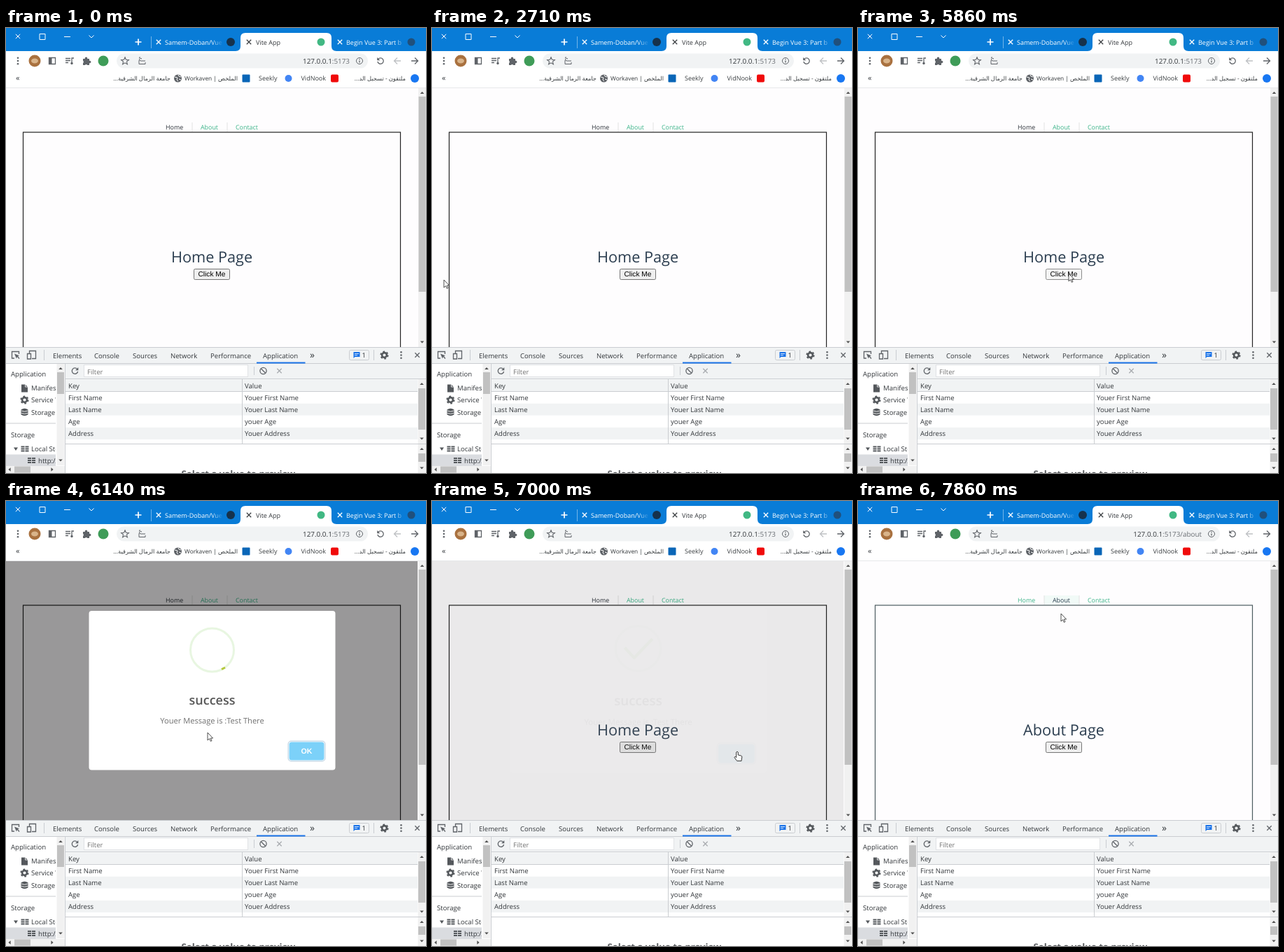
Write an HTML page that moves like this. It is 600 px wide and 636 px high and loops after 8000 ms.

```html
<!DOCTYPE html>
<html lang="en">
<head>
<meta charset="utf-8">
<title>Vite App</title>
<style>
  html, body { margin: 0; width: 100%; height: 100%; overflow: hidden; background: #fff; }
  svg { display: block; width: 600px; height: 636px; }
  text { font-family: "Open Sans", "Noto Sans", sans-serif; font-size: 9.6px; fill: #33373b; text-rendering: geometricPrecision; }
  .tab { font-size: 9px; }
  .tab.inactive { fill: #fff; }
  .mark { font-size: 9px; fill: #3c4043; }
  .rtl { direction: rtl; font-family: "Noto Sans", "DejaVu Sans", sans-serif; font-size: 8.3px; }
  .nav { font-size: 8.9px; }
  .mid { text-anchor: middle; }
  .button { font: 10.2px "Liberation Sans", Arial, sans-serif; fill: #000; }
  .ok { font: bold 10.6px "Liberation Sans", Arial, sans-serif; fill: #fff; }
  .line { fill: none; stroke: #5f6368; stroke-width: 1.3; }
  .white { fill: none; stroke: #fff; stroke-width: 1; }
  .rule { fill: none; stroke: #cacdd1; }
  #modal { transform-origin: 294px 271px; }
</style>
</head>
<body>
<svg viewBox="0 0 600 636">
  <defs>
    <path id="cross" d="M-3.2-3.2 3.2 3.2M3.2-3.2-3.2 3.2"/>
    <path id="tri" d="M-2.8 1.6H2.8L0-1.6Z" fill="#505050"/>
    <g id="dots" fill="#5f6368"><circle cy="-4.2" r="1.3"/><circle r="1.3"/><circle cy="4.2" r="1.3"/></g>
    <g id="gear" fill="none" stroke="#54585c">
      <circle r="3.4" stroke-width="2.6"/><circle r="5.2" stroke-width="1.8" stroke-dasharray="2.7 2.745"/>
    </g>
    <g id="reload"><path class="line" d="M3.2-2.6A4.2 4.2 0 1 0 4.1 1"/><path d="M4.8-5V-.8H.6Z" fill="#5f6368"/></g>
    <path id="grid" d="M-5.5-4h5v2h-5zM.5-4h5v2h-5zM-5.5-1h5v2h-5zM.5-1h5v2h-5zM-5.5 2h5v2h-5zM.5 2h5v2h-5z" fill="#54585c"/>
    <linearGradient id="fade"><stop stop-color="#097cd7" stop-opacity="0"/><stop offset="1" stop-color="#097cd7"/></linearGradient>
    <clipPath id="pageClip"><path d="M0 86H588V456H0Z"/></clipPath>
    <clipPath id="sideClip"><path d="M0 480H71V626H0Z"/></clipPath>
  </defs>

  <!-- title bar -->
  <rect width="600" height="33" fill="#097cd7"/>
  <g class="white">
    <use href="#cross" x="17" y="12"/>
    <path d="M48 8.5h8v8h-8zM83 12.5h9M118.500 10.500l3.500 3.500 3.500-3.500"/>
    <path d="M184.500 20h9M189 15.500v9" stroke-width="1.7"/>
    <path d="M207.500 12v17" stroke="#73b4e8"/>
    <use href="#cross" x="218" y="20" stroke-width="1.3"/>
    <use href="#cross" x="477" y="20" stroke-width="1.3"/>
  </g>
  <text class="tab inactive" x="227" y="23.500">Samem-Doban/Vue</text>
  <text class="tab inactive" x="486" y="23.500">Begin Vue 3: Part b</text>
  <path d="M293 12h16v16h-16zM554 12h16v16h-16z" fill="none"/>
  <rect x="293" y="12" width="17" height="16" fill="url(#fade)"/>
  <rect x="554" y="12" width="17" height="16" fill="url(#fade)"/>
  <circle cx="321" cy="20" r="6" fill="#16324c"/>
  <circle cx="579" cy="20" r="5.500" fill="#20507c"/>
  <path d="M328 33q7 0 7-7V14q0-7 7-7H458q7 0 7 7V26q0 7 7 7Z" fill="#fff"/>
  <use href="#cross" x="347" y="20" stroke="#3c4043" stroke-width="1.300"/>
  <text class="tab" x="357" y="23.500">Vite App</text>
  <circle cx="450" cy="20" r="5.500" fill="#41b883"/>

  <!-- toolbar -->
  <rect y="33" width="600" height="53" fill="#fff"/>
  <rect x="158" y="36.500" width="359" height="21" rx="10.500" fill="#f1f3f4"/>
  <use href="#dots" x="17" y="47"/>
  <circle cx="41" cy="47" r="8.500" fill="#a9713f"/><ellipse cx="41" cy="47" rx="5" ry="3.500" fill="#d9b48a"/>
  <g class="line">
    <path d="M61.500 42.500h9v9h-9z"/><path d="M63.500 43v8" stroke-width="4"/>
    <path d="M85 43.500h7M85 46.500h7M85 49.500h4M94 51v-8h3"/>
    <path d="M170 41.800l1.500 3.500 3.900.3-3 2.500 1 3.800-3.400-2.100-3.400 2.100 1-3.800-3-2.500 3.900-.3Z" stroke-width="1.100"/>
    <path d="M190 46v5.500h9V49M199 47h-6.500q-2 0-2-3M194 44l-4-1.500 1.500-1" stroke-width="1"/>
    <circle cx="505" cy="47" r="4.500" stroke-width="1"/><path d="M505 46.500v3M505 44v1.300"/>
    <path d="M564 47h-9M559 42.500L554.500 47l4.500 4.500" stroke="#bfc1c4"/>
    <path d="M579 47h9M584 42.500l4.500 4.500-4.500 4.500"/>
  </g>
  <path d="M110 44h2.800a1.800 1.800 0 1 1 3.400 0h2.800v2.800a1.800 1.800 0 1 1 0 3.400V53h-3a1.700 1.700 0 0 0-3 0h-3v-3a1.700 1.700 0 0 0 0-3Z" fill="#5f6368"/>
  <circle cx="94" cy="50.500" r="1.700" fill="#5f6368"/>
  <circle cx="139" cy="47" r="7.500" fill="#3f9c58"/>
  <use href="#reload" transform="translate(535 47) scale(-1 1)"/>
  <text x="491" y="50.700" text-anchor="end" style="font-size:9.900px">127.0.0.1<tspan fill="#6b6f74">:5173<tspan id="route"></tspan></tspan></text>

  <!-- bookmarks -->
  <text x="14" y="75" style="font-size:11px">«</text>
  <text class="mark rtl" x="235" y="75">جامعة الرمال الشرقية...</text>
  <circle cx="245.500" cy="72" r="5.500" fill="#5f6368"/>
  <path d="M241 70l4 1-1 3 2 2M246 67l1 2 3 1M247 73l3 1" stroke="#fff" fill="none"/>
  <text class="mark rtl" x="331" y="75">الملخص | Workaven</text>
  <rect x="337.500" y="66.500" width="11" height="11" rx="1" fill="#0a66b7"/>
  <text class="mark" x="361" y="75">Seekly</text>
  <circle cx="403.500" cy="72" r="5" fill="#4285f4"/>
  <text class="mark" x="421.500" y="75">VidNook</text>
  <rect x="464" y="66.500" width="11" height="11" rx="2" fill="#f00a0a"/>
  <text class="mark rtl" x="571" y="75">ملتقون - تسجيل الد...</text>
  <circle cx="584" cy="72" r="6" fill="#1877f2"/>
  <path class="rule" d="M0 85.500H600" stroke-opacity=".45"/>

  <!-- page -->
  <rect y="86" width="589" height="370" fill="#fefdfe"/>
  <g clip-path="url(#pageClip)">
    <rect id="hover" x="266" y="135" width="50" height="13" fill="#00bd7e"/>
    <path d="M266 135v13M316 135v13" stroke="#e2e2e2"/>
    <text class="nav" id="home" x="228" y="145">Home</text>
    <text class="nav" id="about" x="278" y="145">About</text>
    <text class="nav" x="328" y="145" style="fill:#3cb489">Contact</text>
    <rect id="frame" x="24.500" y="149" width="539" height="330" fill="none" stroke-width="1.200"/>
    <text class="mid" id="heading" x="294" y="335" style="font-size:21.700px;fill:#2c3e50"></text>
    <rect id="button" x="268.500" y="344.500" width="51" height="15" rx="1.800"/>
    <text class="button mid" x="294" y="355.300">Click Me</text>
    <rect id="shade" y="86" width="588" height="370"/>
    <g id="modal">
      <rect x="118.500" y="157" width="352" height="227.500" rx="4" fill="#fff"/>
      <circle cx="294.500" cy="213" r="31" fill="none" stroke="#a5dc86" stroke-opacity=".25" stroke-width="3"/>
      <path id="spark" d="M308 240.500l5-2.500" stroke="#b5c83c" stroke-width="3"/>
      <path id="check" d="M276 212l13 14 25-26" pathLength="1" stroke-dasharray="1 1" fill="none" stroke="#a5dc86" stroke-width="4" stroke-linejoin="round"/>
      <text class="mid" x="294.500" y="291" style="font-size:18px;font-weight:600;fill:#595959">success</text>
      <text class="mid" x="294.500" y="318.300" style="font-size:11.100px;fill:#6f6f6f">Youer Message is :Test There</text>
      <rect x="402.500" y="342.500" width="54" height="30" rx="5" fill="#c2d5e4"/>
      <rect x="403.700" y="343.700" width="51.600" height="27.600" rx="4" fill="#fff"/>
      <rect x="404.500" y="344.500" width="50" height="26" rx="3.500" fill="#7cd1f9"/>
      <text class="ok mid" x="429.500" y="361.300">OK</text>
    </g>
  </g>
  <g id="bars"></g>

  <!-- developer tools -->
  <rect y="456" width="600" height="23" fill="#f1f3f4"/>
  <path class="rule" d="M0 456.500H600M0 479.500H600M54.500 460v15M525.500 460v15"/>
  <g class="line" stroke-width="1.200">
    <path d="M12 472H8.500V462.500H18.500V466"/><path d="M12 465.500l7 2.800-2.900 1.200-1.200 2.900Z" fill="#5f6368" stroke="none"/><path d="M16 469l3 3.500"/>
    <path d="M33.500 465V461.500H42.500V472.500H37M30.500 465.500h5v7.500h-5z"/>
    <use href="#cross" x="587.500" y="467.500"/>
  </g>
  <g id="tabs"></g>
  <rect x="358" y="477.500" width="69.500" height="2" fill="#1a73e8"/>
  <text x="434" y="472" style="font-size:14px">»</text>
  <rect x="490.500" y="460.500" width="28" height="14" rx="2" fill="#f1f3f4" stroke="#cacdd1"/>
  <path d="M496.500 463h9v7h-7l-2 2Z" fill="#1a73e8"/><path d="M498 465.500h6M498 467.700h4" stroke="#fff" stroke-width=".8"/>
  <text x="508.500" y="471.300">1</text>
  <use href="#gear" x="540.500" y="467.500"/>
  <use href="#dots" x="564.500" y="467.500"/>

  <!-- sidebar -->
  <g clip-path="url(#sideClip)">
    <rect y="480" width="72" height="146" fill="#fff"/>
    <rect y="609.500" width="72" height="16.500" fill="#dadce0"/>
    <path class="rule" d="M0 565H72"/>
    <path d="M22 509.500h5.500l3.500 3.500v7.500h-9z" fill="#54585c"/><path d="M27.500 509.500V513H31" stroke="#fff" fill="none" stroke-width=".8"/>
    <use href="#gear" x="26.500" y="531.500"/>
    <path d="M21.500 545.500q5-3.500 10 0v7q-5 3.500-10 0Z" fill="#54585c"/><path d="M21.500 547q5 2.500 10 0M21.500 550.300q5 2.500 10 0" stroke="#fff" fill="none" stroke-width=".9"/>
    <path d="M11 599.500h6l-3 4.500Z" fill="#54585c"/>
    <use href="#grid" x="27" y="601.500"/><use href="#grid" x="36.500" y="618"/>
    <g id="tree"></g>
  </g>

  <!-- storage table -->
  <rect x="85" y="480" width="515" height="21.500" fill="#f1f3f4"/>
  <use href="#reload" x="98.500" y="490"/>
  <rect x="111.500" y="481.500" width="234" height="17" fill="#fff" stroke="#e0e2e5"/>
  <text x="116" y="494.500" style="fill:#757575">Filter</text>
  <path class="rule" d="M354.500 484v12"/>
  <g class="line"><circle cx="367.500" cy="490" r="4.600"/><path d="M364.300 486.800l6.400 6.400"/>
    <use href="#cross" x="390.500" y="490" stroke="#a9acb0"/></g>
  <g id="rows"></g>
  <path class="rule" d="M85 501.500H600M85 519.500H588M337.500 502V594M85 594.500H600M84.500 480V636"/>
  <text class="mid" x="332" y="642" style="font-size:13.200px;font-weight:700;fill:#5c5f62">Select a value to preview</text>
  <g id="bars2"></g>

  <path id="arrow" d="M0 0V11L2.600 8.600 4.300 12.400 6 11.600 4.300 8H7.600Z" fill="#fff" stroke="#222" stroke-width=".8"/>
  <path id="hand" d="M-1.300 1Q0-1 1.300 1V5L5.500 6Q7 6.400 6.800 8L6 13.500H-.3L-4 8.600Q-3.700 7-2.400 7.600L-1.300 8.600Z" fill="#fff" stroke="#222" stroke-width=".9"/>
</svg>
<script>
const $ = id => document.getElementById(id);
const label = (x, y, words) => `<text x="${x}" y="${y}">${words}</text>`;

function scrollbar(x, top, bottom, thumbTop, thumbBottom, width = 11) {
  const mid = x + width / 2;
  return `<rect x="${x}" y="${top}" width="${width}" height="${bottom - top}" fill="#f1f1f1"/>
    <rect x="${x + .5}" y="${thumbTop}" width="${width - 1}" height="${thumbBottom - thumbTop}" fill="#c1c1c1"/>
    <use href="#tri" x="${mid}" y="${top + 6.5}"/>
    <use href="#tri" transform="translate(${mid} ${bottom - 7}) scale(1 -1)"/>`;
}

$('bars').innerHTML = scrollbar(589, 86, 456, 98, 377);
$('bars2').innerHTML = scrollbar(588.5, 502, 594, 515, 574) + scrollbar(588.5, 595, 636, 608, 620) +
  scrollbar(72.5, 480, 625, 492, 523) +
  `<rect y="626" width="84" height="10" fill="#f1f1f1"/><rect x="12" y="626.5" width="23" height="9" fill="#c1c1c1"/>
   <use href="#tri" transform="translate(5 631) rotate(-90)"/><use href="#tri" transform="translate(66 631) rotate(90)"/>`;

$('tabs').innerHTML = [['Elements', 67], ['Console', 126], ['Sources', 181], ['Network', 235],
  ['Performance', 292], ['Application', 367]].map(([name, x]) => label(x, 471.5, name)).join('');

$('tree').innerHTML = [[7, 498, 'Application'], [36, 518, 'Manifest'], [36, 535, 'Service Workers'],
  [36, 552.5, 'Storage'], [7, 585, 'Storage'], [36, 605, 'Local Storage'], [46, 622, 'http://127']]
  .map(item => label(...item)).join('');

$('rows').innerHTML = [['Key', 'Value'], ['First Name', 'Youer First Name'], ['Last Name', 'Youer Last Name'],
  ['Age', 'youer Age'], ['Address', 'Youer Address']].map(([key, value], i) =>
    `<rect x="85" y="${502.5 + 17.1 * i}" width="503" height="17.1" fill="${i % 2 ? '#fff' : '#f1f3f4'}"/>` +
    label(89, 515 + 17.1 * i, key) + label(341, 515 + 17.1 * i, value)).join('');

const LOOP = 8000, RATE = 7;
const pointer = [[12, 17, 600], [19, 17, 360], [24, 150, 275], [31, 298, 194], [36, 301, 262], [40, 302, 352],
  [42, 300, 350], [43, 288, 331], [45, 380, 348], [47, 436, 358], [49, 436, 358], [50, 420, 325],
  [52, 295, 146], [53, 289, 139], [54, 289, 142], [55, 290, 161]];
const shade = [[41, 0], [42, .2], [43, .4], [47, .4], [48, .24], [49, .08], [50, 0]];
const modal = [[41, 0, .85], [42, .4, .95], [43, 1, 1], [47, 1, 1], [48, .5, 1.02], [49, .05, 1.04], [50, 0, 1.05]];
const check = [[44, 0], [46, 1]];
const hover = [[51, 0], [52, .15], [53, .2], [54, .2], [55, .05]];

function at(keys, tick) {
  const next = keys.findIndex(key => key[0] > tick);
  if (next < 0) return keys[keys.length - 1].slice(1);
  if (next === 0) return keys[0].slice(1);
  const a = keys[next - 1], b = keys[next], p = (tick - a[0]) / (b[0] - a[0]);
  return a.slice(1).map((v, i) => v + (b[i + 1] - v) * p);
}

const set = (id, attrs) => Object.entries(attrs).forEach(([name, value]) => $(id).setAttribute(name, value));

function draw(tick) {
  const onAbout = tick >= 54;
  $('route').textContent = onAbout ? '/about' : '';
  $('heading').textContent = onAbout ? 'About Page' : 'Home Page';
  $('home').style.fill = onAbout ? '#3cb489' : '#2b3138';
  $('about').style.fill = onAbout ? '#2c3e50' : '#3cb489';
  set('frame', { stroke: onAbout ? '#4c5c60' : '#222' });
  set('hover', { opacity: at(hover, tick)[0] });

  const pressed = tick === 41, hovered = tick === 40;
  set('button', { fill: pressed ? '#f5f5f5' : hovered ? '#e5e5e5' : '#efefef', stroke: pressed ? '#8d8d8d' : '#767676' });

  const [opacity, scale] = at(modal, tick);
  const drawn = at(check, tick)[0];
  set('shade', { opacity: at(shade, tick)[0] });
  set('modal', { opacity });
  $('modal').style.transform = `scale(${scale})`;
  set('spark', { opacity: drawn ? 0 : 1 });
  set('check', { 'stroke-dashoffset': 1 - drawn, opacity: drawn ? 1 : 0 });

  const [x, y] = at(pointer, tick);
  const pointing = (tick >= 47 && tick <= 49) || (tick >= 52 && tick <= 54);
  const transform = `translate(${x} ${y})`;
  set('arrow', { transform, opacity: tick >= 12 && !pointing ? 1 : 0 });
  set('hand', { transform, opacity: pointing ? 1 : 0 });
}

const start = performance.now();
function play() {
  const time = (performance.now() - start) % LOOP;
  draw(Math.floor((time + 5) * RATE / 1000) % (LOOP * RATE / 1000));
  requestAnimationFrame(play);
}
play();
</script>
</body>
</html>
```
